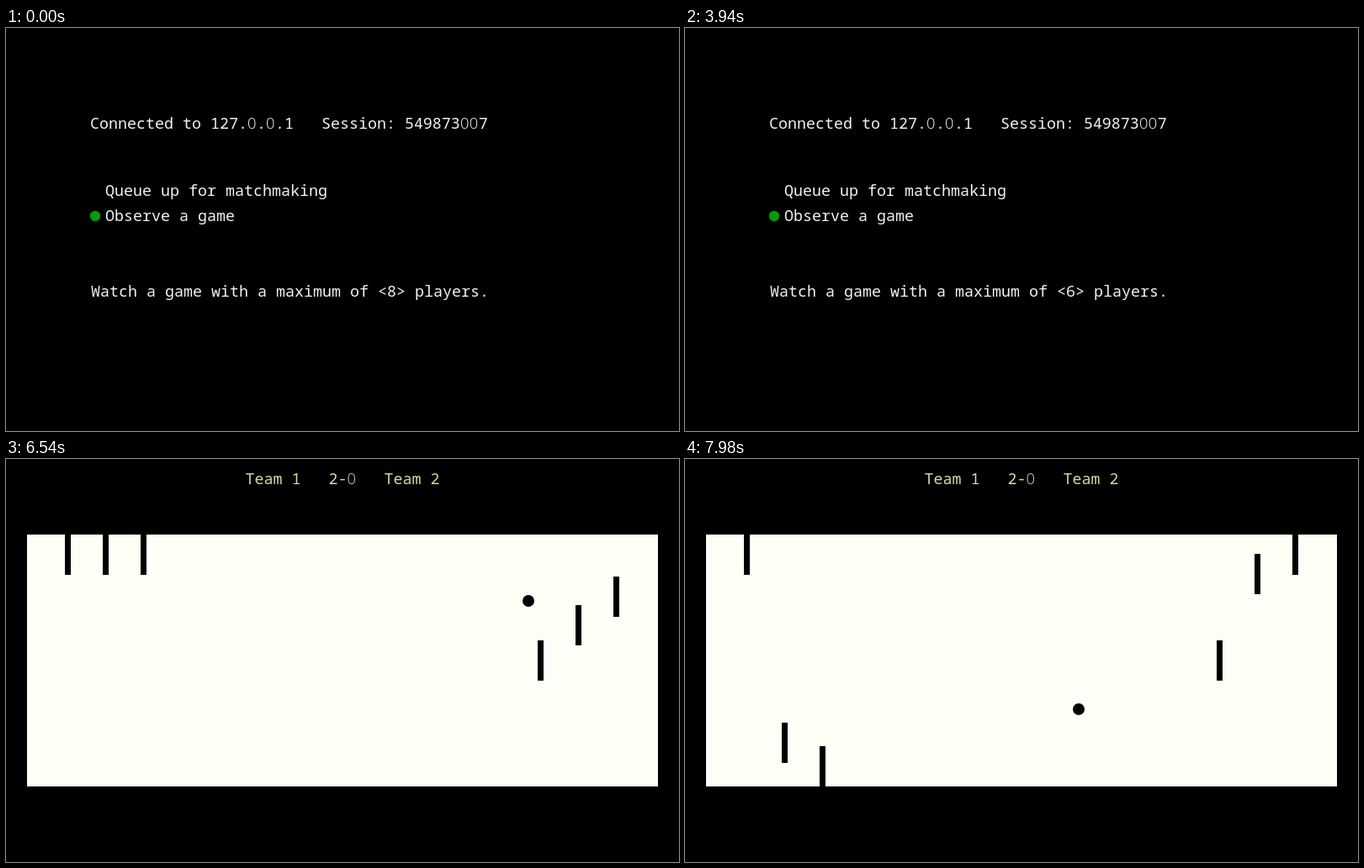
An HTML page for the animation above (8000 ms loop, 800x480 px).

```html
<!DOCTYPE html>
<html lang="en">
<head>
<meta charset="utf-8">
<title>Team paddle game</title>
<style>
  html, body { margin: 0; width: 100%; height: 100%; overflow: hidden; background: #000; }
  svg { display: block; width: 800px; height: 480px; }
  text {
    font: 300 18.33px "Noto Sans Mono", "DejaVu Sans Mono", monospace;
    fill: #f2f2ee;
    white-space: pre;
  }
  .zero { font-family: "Open Sans", sans-serif; letter-spacing: .52px; }
  #wait text { fill: #ecece4; }
  #wait .hint { fill: #deded0; }
  #game text { fill: #d8d8a4; }
  #spin, #field { fill: #fffff8; }
</style>
</head>
<body>
<svg viewBox="0 0 800 480">
  <rect width="800" height="480"/>
  <g id="menu">
    <text x="100" y="120">Connected to 127.<tspan class="zero">0</tspan>.<tspan class="zero">0</tspan>.1   Session: 549873<tspan class="zero">00</tspan>7</text>
    <text x="118" y="200">Queue up for matchmaking</text>
    <circle cx="106" cy="224" r="6.2" fill="#089808"/>
    <text x="118" y="230">Observe a game</text>
    <text x="101" y="320">Watch a game with a maximum of &lt;<tspan id="count">8</tspan>&gt; players.</text>
  </g>
  <g id="wait">
    <text x="290" y="70">Waiting for match...</text>
    <g id="spin"></g>
    <text class="hint" x="295.5" y="400">Press ESC to cancel</text>
  </g>
  <g id="game">
    <text x="284.5" y="30">Team 1   2-<tspan class="zero">0</tspan>   Team 2</text>
    <rect id="field" x="25" y="90" width="750" height="300"/>
    <g id="paddles"></g>
    <circle id="ball" r="7"/>
  </g>
</svg>
<script>
  const LOOP = 8000, STEP = 20, WAIT = 5740, GAME = 6480;
  const SPEED = 0.36; // paddle pixels per ms
  const $ = id => document.getElementById(id);

  function add(parent, tag, attrs) {
    const el = document.createElementNS("http://www.w3.org/2000/svg", tag);
    set(el, attrs);
    return parent.appendChild(el);
  }
  function set(el, attrs) {
    for (const k in attrs) el.setAttribute(k, attrs[k]);
  }

  const dots = Array.from({ length: 8 }, () => add($("spin"), "circle", { r: 7 }));

  // Each paddle: x, resting top, then moves as [start time, new top].
  const paddles = [
    { x: 70, top: 90, moves: [] },
    { x: 115, top: 90, moves: [[6893, 314]] },
    { x: 160, top: 90, moves: [[6893, 342]] },
    { x: 632, top: 216, moves: [] },
    { x: 677, top: 174, moves: [[7810, 113]] },
    { x: 722, top: 162, moves: [[GAME, 90], [7510, 140], [7810, 90]] }
  ];
  for (const p of paddles) p.el = add($("paddles"), "rect", { x: p.x, width: 7, height: 48 });

  function topAt(p, t) {
    let y = p.top;
    for (const [start, to] of p.moves) {
      const d = Math.max(0, t - start) * SPEED;
      y += Math.sign(to - y) * Math.min(d, Math.abs(to - y));
    }
    return Math.round(y);
  }

  function drawSpinner(t) {
    const s = (t - WAIT) / 1000;
    const radius = 45 + 15 * Math.sin(2.08 * s - 0.73);
    dots.forEach((dot, i) => {
      const a = 1.218 * s - 0.158 + i * Math.PI / 4;
      set(dot, {
        cx: Math.round(399.5 + radius * Math.cos(a)),
        cy: Math.round(239.5 + radius * Math.sin(a))
      });
    });
  }

  // The ball bounces off the third paddle and folds between the walls.
  function drawGame(t) {
    const s = (t - 7040) / 1000;
    const x = 174 + Math.abs(190 - 514.9 * s);
    const span = 286;
    const u = (82 + 307.45 * s + 2 * span) % (2 * span);
    const y = 97 + (u > span ? 2 * span - u : u);
    set($("ball"), { cx: Math.round(x), cy: Math.round(y) });
    for (const p of paddles) set(p.el, { y: topAt(p, t) });
  }

  function draw() {
    const t = Math.floor(performance.now() % LOOP / STEP) * STEP;
    const scene = t < WAIT ? "menu" : t < GAME ? "wait" : "game";
    for (const id of ["menu", "wait", "game"]) $(id).style.display = id === scene ? "" : "none";
    if (scene === "menu") $("count").textContent = t < 3340 ? 8 : t < 3940 ? 7 : 6;
    else if (scene === "wait") drawSpinner(t);
    else drawGame(t);
    requestAnimationFrame(draw);
  }
  draw();
</script>
</body>
</html>
```
